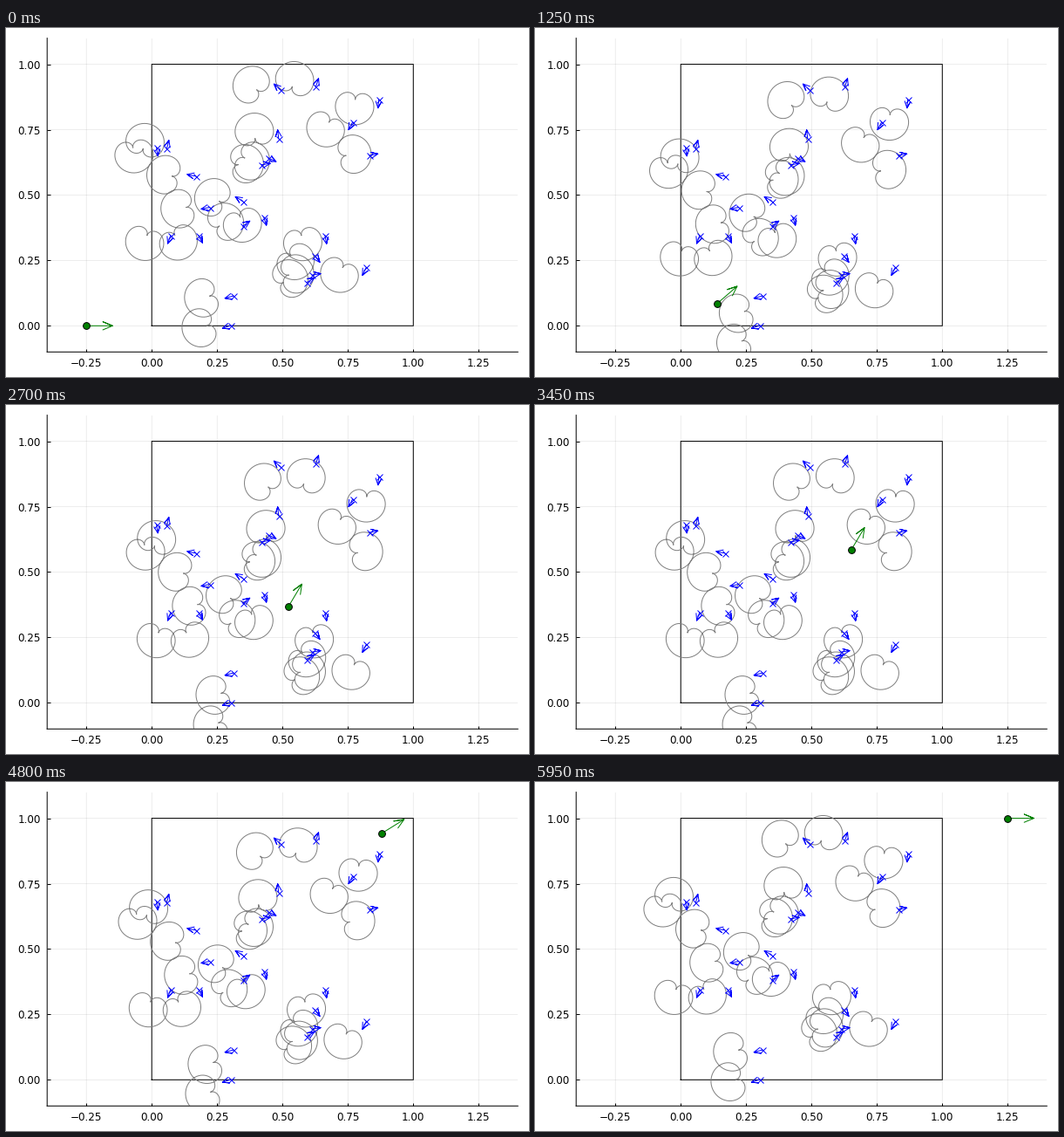
Write a matplotlib script that moves like this. It is 600 px wide and 400 px high and loops after 6000 ms.

```python
import numpy as np
import matplotlib.pyplot as plt
from matplotlib.animation import FuncAnimation

W, H, DPI = 600, 400, 100
FRAMES, INTERVAL = 120, 50
LEFT, RIGHT, TOP, BOTTOM = 47.2, 587.3, 11.6, 371.3
PX = 1 / 300            # one pixel in data units
PT = 72 / DPI           # one pixel in points

TURN_RADIUS = 0.1
LEAD = 0.09             # zone offset against the vehicle heading
REACH = 0.0975

# the vehicle follows this line with rounded corners
WAYPOINTS = [(-0.25, 0), (0.041, 0), (0.273, 0.201), (0.479, 0.295),
             (0.683, 0.637), (0.672, 0.740), (0.797, 0.891), (0.972, 1),
             (1.25, 1)]

# x, y, heading in degrees
PURSUERS = [
    (0.492, 0.902, 137), (0.627, 0.914, 71), (0.868, 0.866, -95),
    (0.768, 0.779, -118), (0.832, 0.651, 11), (0.485, 0.716, 96),
    (0.445, 0.642, -25), (0.420, 0.616, 8), (0.348, 0.476, 148),
    (0.222, 0.453, 191), (0.168, 0.572, 168), (0.018, 0.682, -81),
    (0.057, 0.677, 75), (0.072, 0.346, -109), (0.178, 0.346, -61),
    (0.348, 0.381, 36), (0.428, 0.416, -72), (0.662, 0.346, -79),
    (0.622, 0.269, -52), (0.820, 0.223, -116), (0.613, 0.194, 9),
    (0.593, 0.166, 31), (0.312, 0.114, 195), (0.302, 0.001, 198),
]


def round_corners(points):
    """Heading and straight length of each leg between the rounded corners."""
    step = np.diff([complex(*p) for p in points])
    headings = np.unwrap(np.angle(step))
    trim = TURN_RADIUS * np.tan(np.abs(np.diff(headings)) / 2)
    trim = np.r_[0, trim, 0]
    return headings, np.abs(step) - trim[:-1] - trim[1:]


HEADINGS, STRAIGHTS = round_corners(WAYPOINTS)
TOTAL = STRAIGHTS.sum() + TURN_RADIUS * np.abs(np.diff(HEADINGS)).sum()


def pose(s):
    """Position and heading after travelling s along the path."""
    x, y = WAYPOINTS[0]
    th = HEADINGS[0]
    for goal, straight in zip(HEADINGS, STRAIGHTS):
        turn = goal - th
        arc = min(s, TURN_RADIUS * abs(turn))
        radius = TURN_RADIUS * np.sign(turn)
        if arc > 0:
            new = th + arc / radius
            x += radius * (np.sin(new) - np.sin(th))
            y += radius * (np.cos(th) - np.cos(new))
            th = new
        d = min(s - arc, straight)
        x += d * np.cos(th)
        y += d * np.sin(th)
        s -= arc + d
        if s <= 1e-12:
            break
    return x, y, th


def arrow(x, y, th, length, head, half):
    """Shaft and open head as one polyline."""
    along = np.array([0, length, length - head, length, length - head])
    across = np.array([0, 0, half, 0, -half])
    c, s = np.cos(th), np.sin(th)
    return x + along * c - across * s, y + along * s + across * c


def zone(x, y, th):
    phi = np.linspace(-np.pi, np.pi, 121)
    rho = REACH * np.abs(np.cos(phi / 2)) ** 1.1
    return x + rho * np.cos(phi + th), y + rho * np.sin(phi + th)


def join(curves):
    """Chain curves into one line with gaps."""
    xs, ys = zip(*curves)
    chain = lambda parts: np.concatenate([np.r_[p, np.nan] for p in parts])
    return chain(xs), chain(ys)


plt.rcParams["font.family"] = "DejaVu Sans"
fig = plt.figure(figsize=(W / DPI, H / DPI), dpi=DPI, facecolor="white")
ax = fig.add_axes([LEFT / W, 1 - BOTTOM / H,
                   (RIGHT - LEFT) / W, (BOTTOM - TOP) / H])
ax.set_xlim(-0.4, 1.4)
ax.set_ylim(-0.1, 1.1)
ax.set_axisbelow(True)
ax.grid(color="black", alpha=0.1, lw=0.7 * PT, snap=False)
ax.spines[["top", "right"]].set_visible(False)
for side in ("left", "bottom"):
    ax.spines[side].set(linewidth=PT, snap=False)

for axis, ticks, pad in ((ax.xaxis, np.arange(-0.25, 1.3, 0.25), 7.2),
                         (ax.yaxis, np.arange(0, 1.1, 0.25), 7.2)):
    axis.set_ticks(ticks, [f"{v:.2f}".replace("-", "\u2212") for v in ticks])
    axis.set_tick_params(direction="in", length=3.5 * PT, width=PT,
                         labelsize=12 * PT, pad=pad * PT)


def line(x, y, color, z):
    return ax.plot(x, y, color=color, lw=PT, zorder=z, snap=False)[0]


units = [(x, y, np.radians(a)) for x, y, a in PURSUERS]
ux, uy, _ = zip(*units)
zone_x, zone_y = join([zone(*u) for u in units])

line([0, 1, 1, 0, 0], [0, 0, 1, 1, 0], "black", 2)
zones = line([], [], "gray", 3)
ax.plot(ux, uy, "x", ms=7 * PT, mew=PT, color="blue", zorder=4, snap=False)
line(*join([arrow(*u, 10 * PX, 7.5 * PX, 3.3 * PX) for u in units]), "blue", 4)
heading = line([], [], "green", 5)
body, = ax.plot([], [], "o", ms=7.8 * PT, mfc="green", mec="black", mew=PT,
                zorder=6, snap=False)


def draw(i):
    x, y, th = pose(TOTAL * i / (FRAMES - 1))
    zones.set_data(zone_x - LEAD * np.cos(th), zone_y - LEAD * np.sin(th))
    heading.set_data(*arrow(x, y, th, 0.1, 11 * PX, 4.6 * PX))
    body.set_data([x], [y])
    return zones, heading, body


anim = FuncAnimation(fig, draw, frames=FRAMES, interval=INTERVAL,
                     init_func=lambda: draw(0), repeat=True, repeat_delay=0)
plt.show()
```
